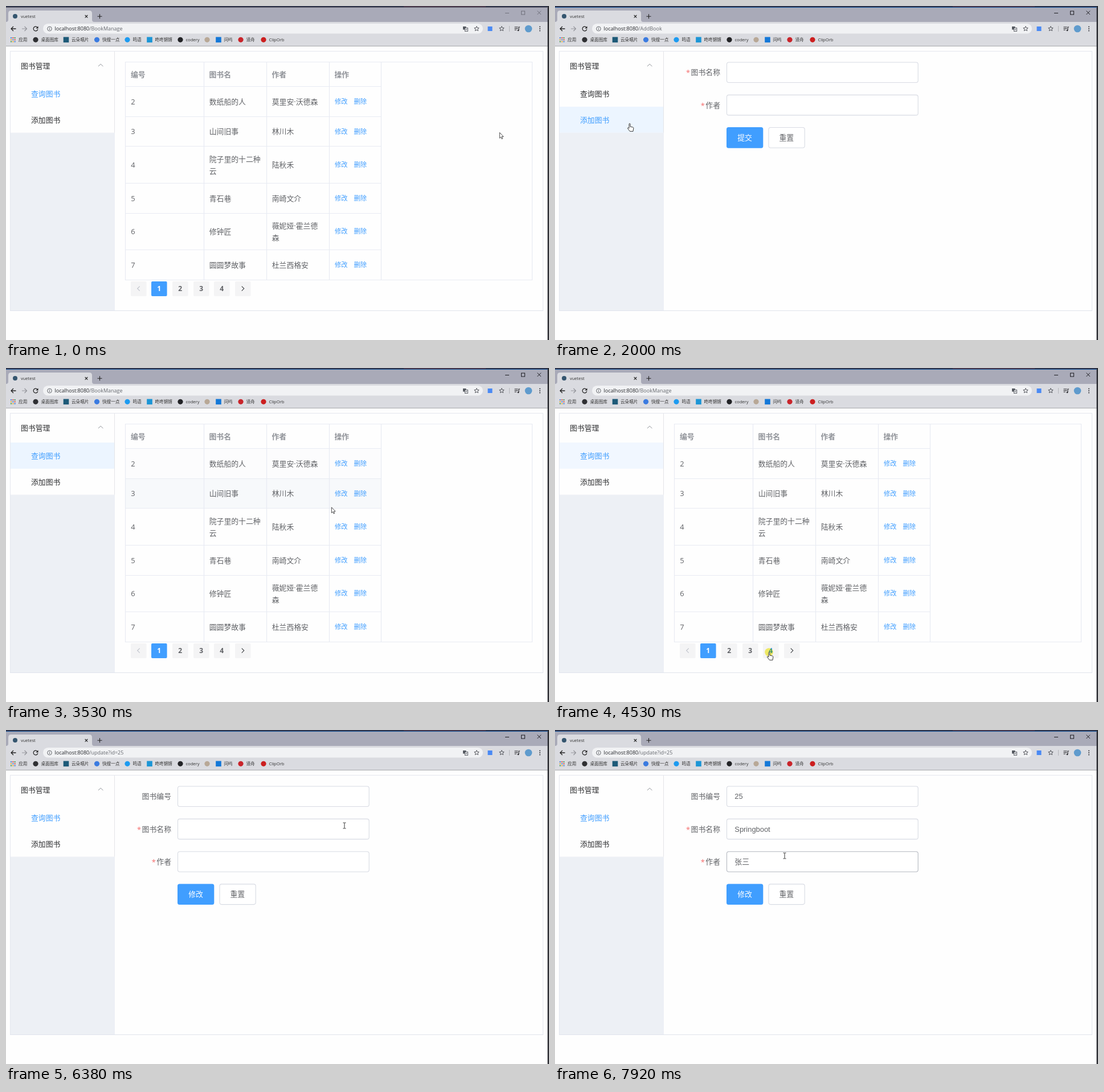
An HTML page that plays this animation: 953 px wide and 587 px high, repeating every 8000 ms.

```html
<!DOCTYPE html>
<html lang="zh">
<head>
<meta charset="utf-8">
<title>vuetest</title>
<style>
html, body { margin: 0; width: 100%; height: 100%; overflow: hidden; background: #fefefe; }
svg { display: block; font-family: "Open Sans", "Noto Sans", "Noto Sans CJK SC", sans-serif; }
text { white-space: pre; }
.flash { mix-blend-mode: multiply; }
</style>
</head>
<body>
<svg id="stage" width="953" height="587" viewBox="0 0 953 587">
  <g id="frame"></g>
  <g id="page"></g>
  <g id="pointer"></g>
</svg>
<script>
const LOOP = 8000, STEP = 1000 / 13;
const BLUE = '#409eff', INK = '#606266', DARK = '#303133', LINE = '#e8ebf3', TINT = '#ecf5ff';

// Pointer hot spot: time, x, y
const PATH = [
  [0, 866, 222], [308, 866, 222], [620, 840, 217], [850, 790, 218], [1000, 690, 235], [1077, 560, 255],
  [1154, 374, 260], [1231, 193, 238], [1400, 150, 212], [1538, 131, 206], [2000, 131, 206],
  [2150, 143, 190], [2308, 121, 165], [2692, 121, 165], [2850, 250, 180], [3154, 612, 186],
  [3308, 612, 186], [3600, 560, 260], [3900, 450, 400], [4154, 376, 467], [4230, 376, 485],
  [4385, 376, 499], [4770, 376, 499], [4920, 480, 360], [5154, 420, 182], [5460, 420, 182],
  [5700, 520, 176], [5846, 594, 168], [6385, 594, 168], [6846, 470, 198], [7000, 420, 222],
  [7307, 369, 231], [7460, 369, 231], [7923, 403, 221], [8000, 403, 221]
];
const CLICKS = [1540, 2460, 4530, 6070];
const COLS = [209.5, 347, 457, 567, 658.5];
const BOOKS = [
  [2, '数纸船的人', '莫里安·沃德森'],
  [3, '山间旧事', '林川木'],
  [4, '院子里的十二种|云', '陆秋禾'],
  [5, '青石巷', '南崎文介'],
  [6, '修钟匠', '薇妮娅·霍兰德|森'],
  [7, '圆圆梦故事', '杜兰西格安']
];
const LAST_BOOK = [25, 'Springboot', '张三'];

const el = id => document.getElementById(id);
const rect = (x, y, w, h, fill, extra = '') =>
  `<rect x="${x}" y="${y}" width="${w}" height="${h}" fill="${fill}" ${extra}/>`;
const disc = (x, y, r, fill, extra = '') => `<circle cx="${x}" cy="${y}" r="${r}" fill="${fill}" ${extra}/>`;
const stroke = (d, color, w = 1) => `<path d="${d}" fill="none" stroke="${color}" stroke-width="${w}"/>`;
// y is the vertical middle of the line
const text = (x, y, s, size = 12.86, fill = INK, extra = '') =>
  `<text x="${x}" y="${y + size * 0.365}" font-size="${size}" fill="${fill}" ${extra}>${s}</text>`;
const inside = ([x, y], x0, y0, x1, y1) => x >= x0 && x < x1 && y >= y0 && y < y1;
// Middle of the pixel, for sharp lines
const crisp = v => Math.floor(v) + 0.5;

function mix(a, b, k) {
  const part = (c, i) => parseInt(c.substr(1 + 2 * i, 2), 16);
  return `rgb(${[0, 1, 2].map(i => Math.round(part(a, i) + (part(b, i) - part(a, i)) * k))})`;
}

// Share of the last four steps during which a condition held: a linear fade
const fade = (test, t) => [0, 1, 2, 3].filter(i => test(t - i * STEP)).length / 4;

function pointerAt(t) {
  let i = 1;
  while (i < PATH.length - 1 && PATH[i][0] < t) i++;
  const [t0, x0, y0] = PATH[i - 1], [t1, x1, y1] = PATH[i];
  const k = Math.min(1, Math.max(0, (t - t0) / (t1 - t0)));
  return [x0 + (x1 - x0) * k, y0 + (y1 - y0) * k];
}

function viewAt(t) {
  if (t >= 6140) return 'update';
  if (t >= 4610) return 'last';
  return t >= 1620 && t < 2600 ? 'add' : 'list';
}

// Table geometry
function layout(books) {
  let y = 141.5;
  const rows = books.map(cells => {
    const h = cells.some(c => String(c).includes('|')) ? 64.7 : 52.6;
    const row = { cells, y, h, mid: y + h / 2 };
    y += h;
    return row;
  });
  return { rows, bottom: y };
}
const TABLES = { list: layout(BOOKS), last: layout([LAST_BOOK]) };
const pagerX = i => Math.round(218.7 + i * 36.65);
const inputY = i => 98.7 + i * 57.4;
const inputCount = view => ({ add: 2, update: 3 })[view] || 0;

const overMenu = (t, i) => inside(pointerAt(t), 8, 131 + 46 * i, 190, 177 + 46 * i);
const overRow = (t, view, row) => viewAt(t) === view && inside(pointerAt(t), 210, row.y, 658, row.y + row.h);
const overLink = (t, row, x) => inside(pointerAt(t), x, row.mid - 7, x + 23, row.mid + 7);
const overPager = (t, bottom, i) => inside(pointerAt(t), pagerX(i), bottom + 2.5, pagerX(i) + 27.5, bottom + 28);
const overInput = (t, i) => inputCount(viewAt(t)) > i && inside(pointerAt(t), 301, inputY(i), 638, inputY(i) + 36);
const focused = (t, i) => i ? t >= 1540 && t < 2500 : t >= 2500 && t < 4530;
const selected = (t, i) => (t >= 1690 && t < 2680 ? 1 : 0) === i;

function pointerKind(t) {
  const table = TABLES[viewAt(t)];
  if ([0, 1].some(i => overMenu(t, i))) return 'hand';
  if ([0, 1, 2].some(i => overInput(t, i))) return 'beam';
  if (table && (table.rows.some(r => overLink(t, r, 577) || overLink(t, r, 610.5)) ||
      [1, 2, 3, 4, 5].some(i => overPager(t, table.bottom, i)))) return 'hand';
  return 'arrow';
}

function star(x, y) {
  let d = '';
  for (let i = 0; i < 10; i++) {
    const a = Math.PI * (i / 5 - 0.5), r = i % 2 ? 2 : 4.4;
    d += (i ? 'L' : 'M') + (x + r * Math.cos(a)).toFixed(2) + ' ' + (y + r * Math.sin(a)).toFixed(2);
  }
  return stroke(d + 'Z', '#44474d', 0.9);
}

function toolbar() {
  let s = stroke('M17.5 40H9M13 36l-4 4 4 4', '#222', 1.3);
  s += stroke('M28 40h8.5M32.5 36l4 4-4 4', '#94959b', 1.2);
  s += stroke('M55.4 38A3.9 3.9 0 1 0 55.8 41', '#222', 1.2) + '<path d="M56.5 35.5v4h-4z" fill="#222"/>';
  s += rect(65, 31, 772, 17.5, '#f1f2f4', 'rx="8.7"');
  s += disc(76.5, 40, 3.8, 'none', 'stroke="#55585e" stroke-width=".9"') + stroke('M76.5 39.5v2.5M76.5 37.6v1', '#55585e');
  s += rect(802, 36, 5.5, 5.5, '#555960') + rect(805.5, 38.5, 5, 6, '#f1f2f4', 'stroke="#555960" stroke-width=".9"');
  s += stroke('M806.5 41h3M808 40v3', '#555960', 0.7);
  s += star(826, 40) + rect(845.5, 36, 8, 8, '#4a8af4') + star(870, 40) + rect(883, 35, 1, 10, '#b4b5bb');
  s += stroke('M892.5 37h6M892.5 39.5h6M892.5 42h3.5M900 42.5V37h2', '#2b2b2f', 1.1) + disc(899, 42.8, 1.4, '#2b2b2f');
  return s + disc(917, 40, 6.3, '#5f9bcd') + [36.5, 40, 43.5].map(y => disc(937, y, 1, '#2b2b2f')).join('');
}

function bookmarks() {
  const dots = ['#d9453b', '#3f7be0', '#e8a920', '#3f9c56'];
  let s = text(22, 59.3, '应用', 7.65, '#333');
  for (let i = 0; i < 9; i++) s += rect(8 + i % 3 * 3.3, 55 + Math.floor(i / 3) * 3.3, 2, 2, dots[(i * 3 + 1) % 4]);
  const mark = (x, label, color, square) =>
    (square ? rect(x - 4.8, 54.5, 9.6, 9.6, color) : disc(x, 59.3, 4.6, color)) + text(x + 9.4, 59.3, label, 7.65, '#333');
  s += mark(52, '桌面图库', '#2f3033') + mark(105.5, '云朵唱片', '#1d5a78', true);
  s += mark(159.5, '快搜一点', '#3b7be0') + mark(213, '鸣语', '#1d9bf0');
  s += mark(252, '咚咚锵锵', '#1c96d6', true) + mark(306, 'codery', '#222326');
  s += mark(353, '', '#b8a896') + mark(373, '问屿', '#1478d8', true);
  return s + mark(412, '译舟', '#c9252b') + mark(452, 'ClipOrb', '#cc1f1f');
}

function browser() {
  let s = rect(0, 0, 953, 28, '#a9aab8') + rect(0, 28, 953, 42, '#dadbe0') + rect(0, 70, 953, 1, '#a8a9ac');
  s += '<path d="M0 28Q4 28 4 24V13Q4 8 9 8H146Q151 8 151 13V24Q151 28 155 28Z" fill="#dadbe0"/>';
  s += disc(16, 18, 4, '#35566f') + text(26, 18.3, 'vuetest', 7.5, '#333');
  s += stroke('M138.7 16l4.6 4.6M143.3 16l-4.6 4.6', '#222', 1.1);
  s += stroke('M160.5 18.3h8M164.5 14.3v8', '#222', 1.1);
  s += toolbar() + bookmarks();
  // Page shell
  s += rect(0, 71, 953, 516, '#fefefe') + rect(7.5, 79.5, 935, 456, '#fefefe', 'stroke="#e4e7ee"');
  s += rect(7.5, 79.5, 183.5, 456, '#edf0f5') + rect(8, 80, 182, 142.5, '#fefefe') + rect(190, 79, 1, 143.5, '#e3e4e8');
  s += stroke('M7.5 536V79.5H943', '#e4e7ee') + stroke('M7 535.5H943', '#e0e4ec');
  s += text(26, 105, '图书管理', 12.86, DARK) + stroke('M162 106l4.2-4 4.2 4', '#909399');
  // Desktop behind the window
  return s + rect(0, 0, 953, 2, '#30354a') + rect(698, 0, 144, 2, '#4a3a4c') + rect(950.5, 0, 2.5, 587, '#2d2e34');
}

function windowState(t, view) {
  const on = t >= 1540, c = on ? '#1d1d22' : '#70717c';
  const url = { list: 'BookManage', last: 'BookManage', add: 'AddBook', update: 'update?id=25' }[view];
  return rect(0, 2, 951, 1, on ? '#2a66a8' : '#6c6d79') +
    stroke('M876 12.5h7', c) + rect(904.5, 9, 6, 6, 'none', `stroke="${c}"`) +
    stroke('M932.5 8.5l6.5 6.5M939 8.5l-6.5 6.5', c) +
    text(85.5, 40, `localhost:8080<tspan fill="#66696f">/${url}</tspan>`, 9, '#26282c');
}

function menu(t) {
  return ['查询图书', '添加图书'].map((label, i) => {
    const tint = fade(u => overMenu(u, i) || focused(u, i), t);
    const color = mix(DARK, BLUE, fade(u => selected(u, i), t));
    return rect(8, 131 + 46 * i, 182, i ? 45.5 : 46, mix('#fefefe', TINT, tint)) + text(44, 154 + 46 * i, label, 12.86, color);
  }).join('');
}

function table(t, view) {
  const { rows, bottom } = TABLES[view], end = crisp(bottom);
  let s = '';
  for (const row of rows)
    s += rect(210, row.y, 448.5, row.h, mix('#fefefe', '#f5f7fa', fade(u => overRow(u, view, row), t)));
  ['编号', '图书名', '作者', '操作'].forEach((h, i) => {
    s += text(COLS[i] + 9.5, 120, h, 12.86, '#909399', 'font-weight="bold"');
  });
  for (const row of rows) {
    row.cells.forEach((cell, i) => {
      const lines = String(cell).split('|');
      lines.forEach((line, n) => {
        s += text(COLS[i] + 9.7, row.mid + 0.3 + (n - (lines.length - 1) / 2) * 21, line);
      });
    });
    s += [[577, '修改'], [610.5, '删除']].map(([x, label]) =>
      text(x, row.mid, label, 11.3, overLink(t, row, x) ? '#66b1ff' : BLUE)).join('');
  }
  let d = rows.map(r => `M209.5 ${crisp(r.y)}H658.5`).join('');
  d += COLS.map(x => `M${crisp(x)} 98V${end}`).join('') + `M209 98.5H923.5V${end}H209`;
  return s + stroke(d, LINE, 1.2) + pager(t, view, bottom);
}

function pager(t, view, bottom) {
  const current = view === 'last' ? 4 : 1, mid = bottom + 15.3;
  let s = '';
  for (let i = 0; i < 6; i++) {
    const x = pagerX(i), c = x + 13.7, on = i === current;
    s += rect(x, Math.round(bottom + 2.5), 27.6, 26, on ? BLUE : '#f4f4f5', 'rx="2"');
    if (i % 5) {
      const color = on ? '#fff' : overPager(t, bottom, i) ? BLUE : INK;
      s += text(c, mid, i, 12, color, 'text-anchor="middle" font-weight="bold"');
    } else {
      const off = current === (i ? 4 : 1), k = i ? 1 : -1;
      s += stroke(`M${c - 2 * k} ${mid - 4}l${4 * k} 4l${-4 * k} 4`, off ? '#c0c4cc' : '#45474b', 1.2);
    }
  }
  return s;
}

function form(t, view) {
  const edit = view === 'update', count = inputCount(view);
  const labels = edit ? ['图书编号', '图书名称', '作者'] : ['图书名称', '作者'];
  const middle = 'text-anchor="middle"', outline = 'rx="3.5" stroke-width="1.1" stroke=';
  let s = '';
  labels.forEach((label, i) => {
    const y = inputY(i), mid = y + 17.8;
    const border = mix('#d8dbe3', '#b4b8c0', fade(u => u > 6400 && overInput(u, i), t));
    s += text(290, mid, label, 12.86, INK, 'text-anchor="end"');
    if (!edit || i) s += text(290 - label.length * 12.86 - 8.5, mid + 1, '*', 12.86, '#f56c6c');
    s += rect(301.5, y + 0.3, 335.7, 35.5, '#fff', `${outline}"${border}"`);
    if (edit && t >= 6450)
      s += text(315.3, mid, LAST_BOOK[i], 12.9, INK, `font-family="'Liberation Sans', 'Noto Sans CJK SC', sans-serif"`);
  });
  const y = inputY(count) - 0.5;
  s += rect(301, y, 64.3, 36.7, BLUE, 'rx="3.5"') + text(333, y + 18.3, edit ? '修改' : '提交', 12.86, '#fff', middle);
  s += rect(375, y + 0.5, 63.2, 35.7, '#fff', `${outline}"#d8dbe3"`);
  return s + text(406.3, y + 18.3, '重置', 12.86, INK, middle);
}

const SHAPES = {
  arrow: '<path d="M.4.4V10.3L2.6 8.2 4.1 11.7 5.7 11 4.2 7.6H7.2Z" fill="#fff" stroke="#222" stroke-width=".8"/>',
  hand: '<path d="M-1 1.5C-1 .2 1 .2 1 1.5V6L5.5 7C6.6 7.3 7 8 6.8 9L6 14.3H.5L-3.4 9.3C-4 8.3-3 7.6-2 8.2L-1 9Z" fill="#fff" stroke="#222" stroke-width=".9"/>',
  beam: stroke('M-2.5-5H-.7L0-4.5.7-5H2.5M0-4.5V4.5M-2.5 5H-.7L0 4.5.7 5H2.5', '#333')
};

function pointer(t) {
  const [x, y] = pointerAt(t);
  const flash = CLICKS.some(c => t >= c && t < c + 140);
  return (flash ? disc(x - 0.5, y + 0.5, 7.3, '#f9f36a', 'class="flash"') : '') +
    `<g transform="translate(${x.toFixed(1)} ${y.toFixed(1)})">${SHAPES[pointerKind(t)]}</g>`;
}

function draw(t) {
  const view = viewAt(t);
  el('page').innerHTML = windowState(t, view) + menu(t) + (TABLES[view] ? table(t, view) : form(t, view));
  el('pointer').innerHTML = pointer(t);
}

el('frame').innerHTML = browser();
let shown = -1;
function tick() {
  // The screen refreshes 13 times a second
  const step = Math.floor((performance.now() % LOOP + 9) / STEP);
  if (step !== shown) draw(Math.min(step * STEP, LOOP));
  shown = step;
  requestAnimationFrame(tick);
}
tick();
</script>
</body>
</html>
```
